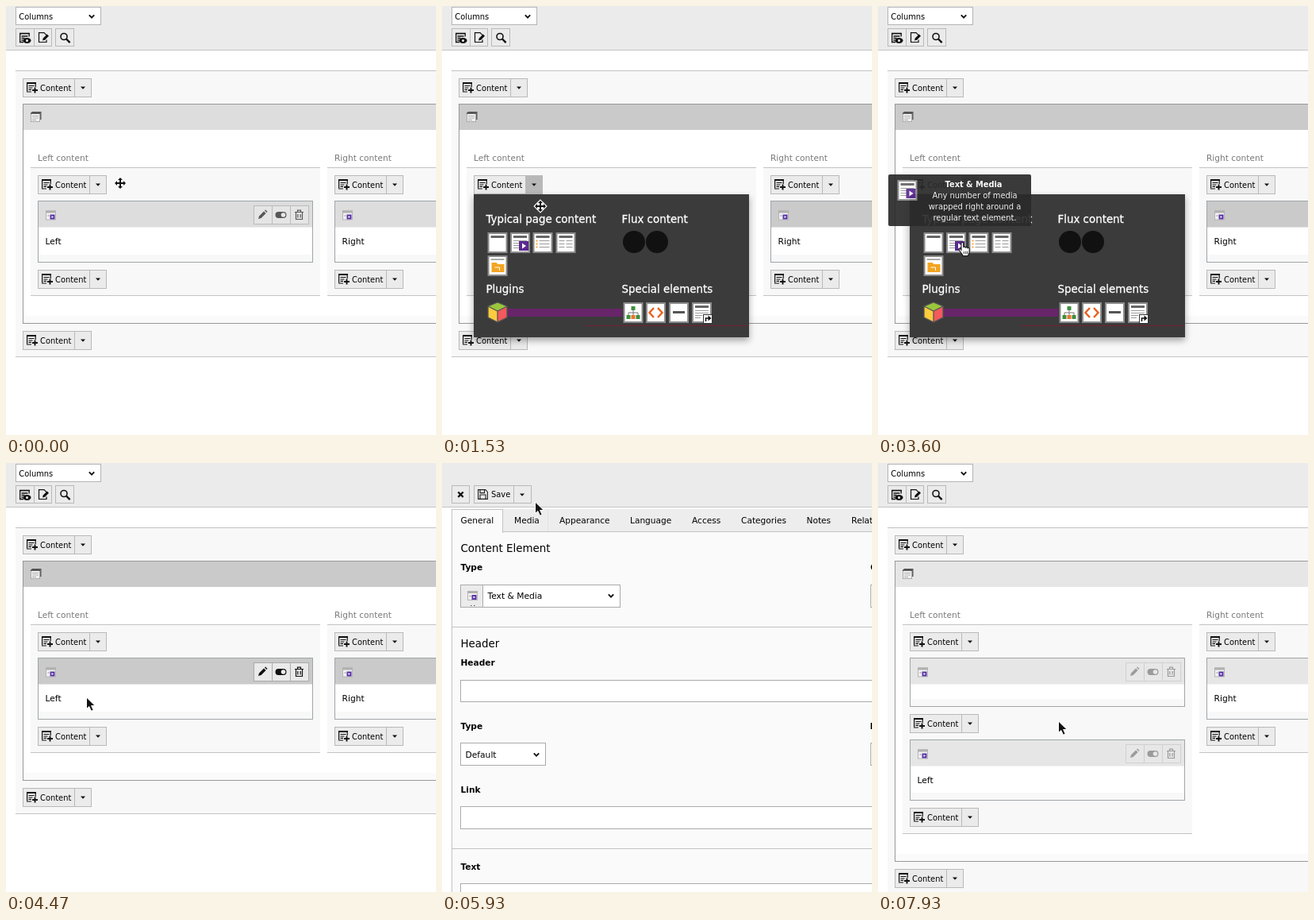
An HTML page for the animation above (8 s loop, 542x540 px).

```html
<!DOCTYPE html>
<html lang="en">
<head>
<meta charset="utf-8">
<title>Page editor</title>
<style>
html, body { margin: 0; width: 100%; height: 100%; overflow: hidden; background: #fff; }
svg { display: block; width: 542px; height: 540px; font-family: "DejaVu Sans", Verdana, sans-serif; }
.head { fill: var(--head); }
.act { opacity: var(--act); }
.arrowbtn { fill: var(--drop); }
.pop text { fill: #fff; stroke: #fff; stroke-width: .3px; }
.tip text { fill: #fff; text-anchor: middle; }
</style>
</head>
<body>
<svg id="stage" viewBox="0 0 542 540" xmlns="http://www.w3.org/2000/svg"></svg>
<script>
const stage = document.getElementById('stage');

// drawing helpers
const fill = (x, y, w, h, c, more = '') => `<rect x="${x}" y="${y}" width="${w}" height="${h}" fill="${c}" ${more}/>`;
const box = (x, y, w, h, c, line) => fill(x + .5, y + .5, w - 1, h - 1, c, `stroke="${line}"`);
const text = (x, y, s, size = 10.7, more = '') => `<text x="${x}" y="${y}" font-size="${size}" ${more}>${s}</text>`;
const bold = (x, y, s, size = 10.6) => text(x, y, s, size, 'font-weight="bold"');
const line = (d, c = '#111', w = 1, more = '') => `<path d="${d}" fill="none" stroke="${c}" stroke-width="${w}" ${more}/>`;
const shape = (d, c = '#111', more = '') => `<path d="${d}" fill="${c}" ${more}/>`;
const at = (x, y, s, more = '') => `<g transform="translate(${x} ${y})" ${more}>${s}</g>`;
const group = (id, s, cls = '') => `<g id="${id}" class="${cls}">${s}</g>`;
const caret = (x, y) => shape(`M${x - 3} ${y - 1.5}h6l-3 3.2z`);
const chevron = (x, y) => line(`M${x - 3.2} ${y - 1.6}l3.2 3.2 3.2 -3.2`, '#111', 1.9);
const GREY = '#c3c3c3', BTN = '#ebebeb', EDGE = '#b9b9b9';

const floppy = c => line('M.6 .6h9l2.8 2.8v9h-11.8z', c, 1.1) + line('M3 .8v3.8h5.5v-3.8M3 12v-5h7v5', c, 1.1);

function contentButton(x, y, cls = '') {
  const icon = line('M.6 11.5v-10.5h10.6v5', '#111', 1.2) + line('M0 1h12', '#111', 2) +
    line('M2.5 4.5h7M2.5 7h5M2.5 9.4h3.5M0 12h6', '#111', 1.1) + line('M7 10h7M10.5 6.5v7', '#111', 1.9);
  return box(x, y, 87, 24, BTN, EDGE) +
    fill(x + 65.5, y + .5, 21, 23, BTN, `stroke="${EDGE}" class="${cls}"`) +
    at(x + 5, y + 5, icon) + text(x + 22, y + 16, 'Content', 9.9) + caret(x + 76, y + 12);
}

function typeIcon(x, y) {
  return box(x, y, 13, 12, '#f1f1f1', '#b5b5b5') + fill(x, y, 13, 3, '#b0b0b0') +
    line(`M${x + 2.5} ${y + 6.5}h2`, '#888') + fill(x + 5.5, y + 5, 6, 6, '#5b35a8') +
    shape(`M${x + 7.5} ${y + 6.5}l2.6 1.5 -2.6 1.5z`, '#fff');
}

function actions(x, y) {
  const pencil = shape('M-5.5 5l1-3.6 6-6 2.6 2.6 -6 6z M2.5 -5.5l1.1 -.9 2.4 2.4 -1 1z');
  const toggle = fill(-7, -4, 14, 8, '#111', 'rx="4"') + '<circle cx="3" r="2.8" fill="#eee"/>';
  const bin = line('M-4 -3v8.5h8v-8.5M-5.5 -3.5h11M-2 -4v-1.8h4v1.8M-1.7 -1v4.5M1.7 -1v4.5', '#111', 1.2);
  return [pencil, toggle, bin].map((icon, i) =>
    box(x + 23 * i, y, 24, 24, '#eaeaea', '#aaa') + at(x + 11.5 + 23 * i, y + 12, icon)).join('');
}

function card(x, y, w, h, label, tools) {
  return box(x, y, w, h, '#fff', '#a0a5a8') +
    fill(x + 1, y + 1, w - 2, 32.5, '', 'class="head"') + fill(x + 1, y + h - 10, w - 2, 9, '#f8f8f8') +
    typeIcon(x + 10, y + 12.5) + text(x + 9.5, y + 55, label) +
    (tools ? `<g class="act">${actions(x + 272, y + 6)}</g>` : '');
}

function column(x, w, end, label) {
  return text(x + 9, 195, label, 10.6, 'fill="#787878"') + fill(x, 204, w, end - 204, '#f8f8f8') +
    fill(x, 203, w, 1, GREY) + fill(x, end, w, 1, GREY);
}

function topBar() {
  const view = line('M.7 12v-11h11.5v4', '#111', 1.3) + line('M0 1.2h13M2.5 4.5h8M2.5 7h4M2.5 9.5h2M0 12h5', '#111', 1.3) +
    '<ellipse cx="9.5" cy="10" rx="5" ry="3.4" fill="#111"/><circle cx="9.5" cy="10" r="1.5" fill="#eee"/>';
  const edit = line('M8 .7h-7v11.8h9.5v-3M7.5 .7l3 3', '#111', 1.2) + shape('M5.5 10.5l.8-3 5-5 2.2 2.2 -5 5z');
  const find = '<circle cx="5" cy="5" r="4" fill="none" stroke="#111" stroke-width="1.6"/>' + line('M8 8l4.6 4.6', '#111', 2.4);
  return box(12, 1, 108, 23, '#fff', '#b4b4b4') + text(16.3, 17, 'Columns', 9.9) + chevron(108, 13) +
    box(12, 28, 24, 23, BTN, EDGE) + box(35, 28, 23, 23, BTN, EDGE) + box(62, 28, 24, 23, BTN, EDGE) +
    at(17, 33.5, view) + at(40.5, 33, edit) + at(68, 33.5, find);
}

function page(two) {
  const d = two ? 102 : 0;
  const stack = box(1.5, 1, 12, 10, '#777', '#555') + box(0, 3, 12, 11, '#f2f2f2', '#aaa') +
    line('M0 3h12', '#444', 1.4) + line('M2 6.5h8M2 9h8M2 11.5h5', '#aaa');
  return fill(0, 55, 542, 1, GREY) + topBar() +
    fill(12, 81, 530, 361 + d, '#f8f8f8') + fill(12, 81, 530, 1, GREY) + fill(12, 441 + d, 530, 1, GREY) +
    contentButton(21, 91) +
    box(21, 123, 540, 277 + d, '#fff', '#999') + fill(22, 124, 520, 32, '', 'class="head"') +
    fill(22, 390 + d, 520, 9, '#fafafa') + at(31, 132, stack) +
    column(31, 365, 364 + d, 'Left content') + column(405, 150, 364, 'Right content') +
    contentButton(40, 213, two ? '' : 'arrowbtn') +
    (two ? card(40, 245, 347, 62, '', true) + contentButton(40, 316) + card(40, 348, 347, 77, 'Left', true)
         : card(40, 245, 347, 78, 'Left', true)) +
    contentButton(40, 332 + d) +
    contentButton(414, 213) + card(414, 245, 200, 78, 'Right') + contentButton(414, 332) +
    contentButton(21, 409 + d);
}

// element chooser
const tile = s => fill(1, 1, 23, 24, '#fff', 'stroke="#8c8c8c" stroke-width="2"') + s;
const bar = fill(4, 4, 17, 3, '#666');
const rows = (d, c = '#999') => line(d, c, 1);
const mediaTile = tile(bar + rows('M4 10.5h17M4 13.5h8M4 16.5h8M4 19.5h8') + fill(11, 11, 12, 12, '#5a2a90') + shape('M15 13.5l5 3.5 -5 3.5z', '#fff'));

function chooser() {
  const list = tile(bar + rows('M8 10.5h13M8 14.5h13M8 18.5h13') + line('M4 10.5h2M4 14.5h2M4 18.5h2', '#f5a33b', 2));
  const table = tile(bar + rows('M4 10.5h7M13 10.5h8M4 14.5h7M13 14.5h8M4 18.5h7M13 18.5h8'));
  const folder = tile(fill(4, 4, 17, 2, '#aaa') + shape('M5 9h6l2 2h8v10h-16z', '#f3a421') + rows('M9 15h6v4', '#fff'));
  const cube = shape('M13 0l12 5 -12 6 -12 -6z', '#9ac63c') + shape('M1 5l12 6v14l-12 -6z', '#fccb3e') +
    shape('M25 5l-12 6v14l12 -6z', '#f4595d') + line('M13 0l12 5v14l-12 6 -12 -6v-14zM1 5l12 6 12 -6M13 11v14', '#555', 1.3);
  const tree = tile(line('M12.5 8v5M6.5 17v-4h12v4M12.5 13v4', '#777') + fill(10, 5, 5, 5, '#3f8f3f') +
    fill(4, 16, 5, 5, '#3f8f3f') + fill(10, 16, 5, 5, '#e8772e') + fill(16, 16, 5, 5, '#3f8f3f'));
  const code = tile(line('M10 7l-5.5 6 5.5 6M15 7l5.5 6 -5.5 6', '#e8601c', 2.4));
  const rule = tile(fill(5, 11, 15, 3, '#555'));
  const ref = tile(bar + rows('M4 10.5h17M4 13.5h17M4 16.5h9M4 19.5h7')) + box(14, 15, 12, 12, '#fff', '#333') +
    line('M17.5 24v-4h4', '#111', 1.6) + shape('M20.5 16.5l4 3.5 -4 3.5z');
  return fill(40, 237, 347, 180, '#3a3a3a', 'filter="url(#shade)"') +
    fill(83, 381, 144, 10, '#68256a') + fill(180, 402, 206, 1, '#71222f') +
    text(55.5, 273, 'Typical page content', 13.4) + text(226.5, 273, 'Flux content', 13.4) +
    text(55.5, 361, 'Plugins', 13.4) + text(226.5, 361, 'Special elements', 13.4) +
    at(57.5, 285, tile(bar)) + at(86, 285, mediaTile) + at(114.5, 285, list) + at(143.5, 285, table) + at(57.5, 314, folder) +
    '<circle cx="242" cy="297" r="14" fill="#111"/><circle cx="271" cy="297" r="14" fill="#111"/>' +
    at(57, 373, cube) + at(228.5, 373, tree) + at(257, 373, code) + at(286, 373, rule) + at(315, 373, ref);
}

function tooltip() {
  return fill(13, 212, 180, 65, '#2a2a2a', 'rx="2"') + at(24.5, 219, mediaTile) + bold(120.5, 228, 'Text &amp; Media', 9.8) +
    ['Any number of media', 'wrapped right around a', 'regular text element.'].map((s, i) => text(122, 242 + 14 * i, s, 9.9)).join('');
}

function form() {
  const tabs = [[23.5, 'General'], [91, 'Media'], [148, 'Appearance'], [237, 'Language'], [315, 'Access'],
    [377, 'Categories'], [459.5, 'Notes'], [516, 'Relations']];
  const field = (y, h = 28) => box(23, y, 540, h, '#fff', '#aaa');
  return fill(0, 55, 542, 1, GREY) +
    box(12, 28, 23, 23, BTN, EDGE) + line('M20.3 36.5l6.4 6.4M26.7 36.5l-6.4 6.4', '#111', 2.2) +
    box(40, 28, 73, 23, BTN, EDGE) + fill(90.5, 28.5, 22, 22, '', `stroke="${EDGE}" class="arrowbtn"`) +
    at(45, 33, floppy('#222')) + text(62, 43.3, 'Save', 9.9) + caret(101, 40) +
    box(12, 86, 560, 500, '#fafafa', GREY) + fill(77, 58, 465, 28, '#ededed') + fill(133, 59, 1, 27, '#e4e4e4') +
    box(12, 58, 65, 30, '#fafafa', GREY) + fill(13, 86, 63, 3, '#fafafa') +
    tabs.map(([x, s]) => text(x, 76, s, 10.6)).join('') +
    text(23.5, 112, 'Content Element', 13.4) + bold(23.5, 135, 'Type') + bold(540, 135, 'Column') +
    box(23, 153, 202, 29, '#fff', '#aaa') + box(23, 153, 29, 29, BTN, '#aaa') + typeIcon(32, 161) +
    line('M36 179.5h1.5M40 179.5h1.5', '#555') + text(57.5, 171, 'Text &amp; Media') + chevron(213, 167) + box(540, 153, 40, 29, '#fff', '#aaa') +
    fill(13, 206, 529, 1, GREY) + text(23.5, 232, 'Header', 13.4) + bold(23.5, 255, 'Header') + field(273) +
    bold(23.5, 335, 'Type') + bold(539.5, 335, 'Layout') + box(23, 352, 108, 29, '#fff', '#aaa') +
    text(29.5, 371, 'Default') + chevron(119, 367) + box(540, 352, 40, 29, '#fff', '#aaa') +
    bold(23.5, 415, 'Link') + field(432, 29) + fill(13, 485, 529, 1, GREY) + bold(23.5, 512, 'Text') + field(529, 60);
}

function saveMenu() {
  const marks = ['<circle cx="9.5" cy="10" r="3" fill="#fff"/>', line('M6 10h7M9.5 6.5v7', '#fff', 1.8), line('M7 7.5l5.5 5.5M12.5 7.5l-5.5 5.5', '#fff', 1.8)];
  return fill(40, 51, 202, 73, '#3a3a3a', 'filter="url(#shade)"') +
    ['Save and view page', 'Save and create a new one', 'Save and close'].map((s, i) =>
      at(59, 60 + 21.5 * i, floppy('#fff') + fill(6, 6.5, 7.5, 7, '#3a3a3a') + marks[i]) + text(75.5, 70 + 21.5 * i, s, 10.85)).join('');
}

const arrow = shape('M0 0v14.5l3.3-3 2.7 5.8 2.7-1.2 -2.6-5.6h4.6z', '#111', 'stroke="#fff" stroke-width="1"');
const hand = shape('M-1.4 1c0-1.6 2.8-1.6 2.8 0v5c.4-1.2 2.5-1 2.6.2 .6-.9 2.4-.6 2.5.6 .7-.7 2.3-.3 2.3 1v4c0 2-1.5 3-1.5 5h-6.5c-.5-2.5-3.5-4.500-5-7.800 -.3-1.500 1.500-1.800 2.800.300z', '#fff', 'stroke="#111" stroke-width="1.1"') +
  line('M2 11v3.500M4.300 11v3.500M6.300 11v3.500', '#111', .8);
const cross = 'M0 -7l3 3h-2v3h3v-2l3 3 -3 3v-2h-3v3h2l-3 3 -3 -3h2v-3h-3v2l-3 -3 3 -3v2h3v-3h-2z';
const move = shape(cross, '#111', 'stroke="#fff" stroke-width="2.4" paint-order="stroke"');

stage.innerHTML = '<defs><filter id="shade" x="-10%" y="-20%" width="120%" height="150%"><feDropShadow dx="0" dy="4" stdDeviation="4" flood-opacity=".35"/></filter></defs>' +
  fill(0, 0, 542, 540, '#fff') + fill(0, 0, 542, 55, '#ebebeb') +
  group('before', page(false)) + group('after', page(true)) + group('form', form()) +
  group('menu', chooser(), 'pop') + group('tip', tooltip(), 'tip') + group('save', saveMenu(), 'pop') +
  group('arrow', arrow) + group('hand', hand) + group('move', move);

// timing tables: [ms, value...]
const path = [[0, 144, 223], [330, 116, 221], [1470, 116, 221], [1530, 124, 252], [1800, 107, 298], [2870, 107, 298],
  [3130, 110, 295], [3270, 110, 295], [3670, 106, 298], [4000, 106, 298], [4200, 102, 297], [4400, 102, 297], [4470, 101.5, 295],
  [4930, 233, 221], [5470, 233, 221], [5930, 117.5, 49], [6130, 101, 36], [6200, 101, 36], [6600, 124.5, 118],
  [7070, 115, 108], [7600, 227.5, 325], [8000, 227.5, 325]];
const heads = [[0, 221], [330, 202], [7870, 202], [7930, 230]];
const acts = [[0, .65], [330, 1], [7870, 1], [7930, .35]];
const menuFade = [[600, 0], [1000, 1], [4400, 1], [4470, 0]];
const tipFade = [[2400, 0], [2670, 1], [2930, 1], [3130, 0], [3270, 0], [3670, 1], [4400, 1], [4470, 0]];
const saveFade = [[6200, 0], [6400, 1], [7070, 1], [7130, 0]];
const scenes = [[0, 'before'], [4930, ''], [5070, 'form'], [7530, ''], [7930, 'after']];
const cursors = [[0, 'move'], [270, 'hand'], [1530, 'move'], [1730, 'hand'], [4470, 'arrow'], [6070, 'hand'],
  [6330, 'arrow'], [6930, 'hand'], [7130, 'arrow']];
const drops = [[0, BTN], [270, '#dcdcdc'], [530, '#b8b8b8'], [4470, BTN], [6070, '#dcdcdc'], [6270, '#b8b8b8'], [7130, BTN]];

const held = (table, t) => table.filter(k => k[0] <= t).pop()[1];
function tween(table, t, col = 1) {
  const i = table.findIndex(k => k[0] > t);
  if (i < 0) return table[table.length - 1][col];
  if (i === 0) return table[0][col];
  const a = table[i - 1], b = table[i], p = (t - a[0]) / (b[0] - a[0]);
  return a[col] + (b[col] - a[col]) * p * p * (3 - 2 * p);
}

const el = Object.fromEntries([...stage.querySelectorAll('g[id]')].map(g => [g.id, g]));
const show = (id, on) => { el[id].style.display = on ? '' : 'none'; };

function draw(now) {
  // fifteen pictures a second
  const t = Math.round(Math.floor(((now % 8000) + 4) * 3 / 200) * 20 / 3) * 10 % 8000;
  const scene = held(scenes, t), cursor = held(cursors, t), h = tween(heads, t);
  ['before', 'after', 'form'].forEach(id => show(id, id === scene));
  [['menu', menuFade], ['tip', tipFade], ['save', saveFade]].forEach(([id, table]) => {
    const a = tween(table, t);
    show(id, a > 0);
    el[id].style.opacity = a;
  });
  ['arrow', 'hand', 'move'].forEach(id => show(id, id === cursor));
  el[cursor].setAttribute('transform', `translate(${tween(path, t, 1)} ${tween(path, t, 2)})`);
  stage.style.setProperty('--head', `rgb(${h},${h},${h})`);
  stage.style.setProperty('--act', tween(acts, t));
  stage.style.setProperty('--drop', held(drops, t));
}

let start;
function tick(now) {
  start ??= now;
  draw(now - start);
  requestAnimationFrame(tick);
}
draw(0);
requestAnimationFrame(tick);
</script>
</body>
</html>
```
